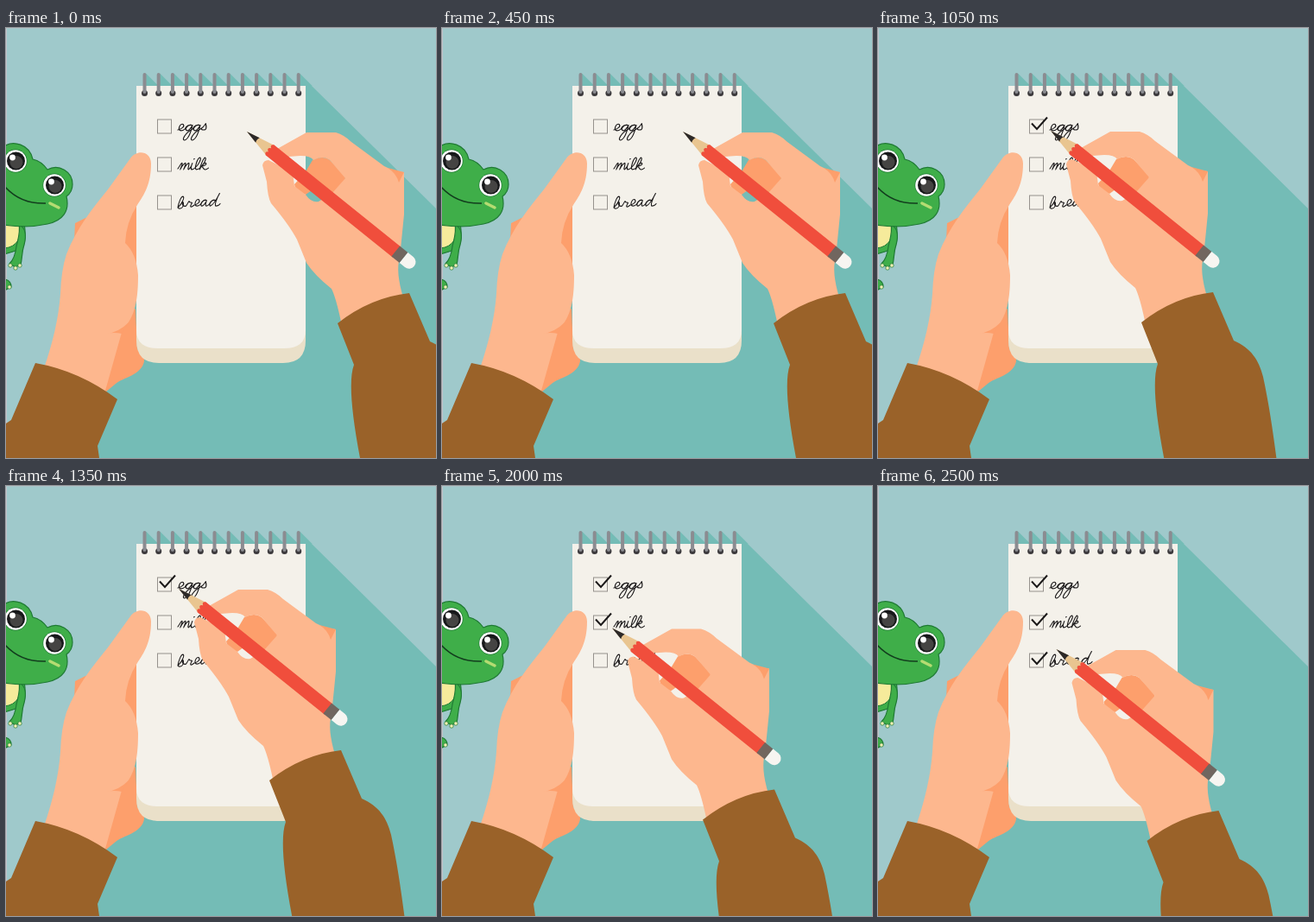
Write an HTML page that moves like this. It is 498x498 px and loops after 2550 ms.

```html
<!DOCTYPE html>
<html lang="en">
<head>
<meta charset="utf-8">
<title>Shopping list</title>
<style>
  html, body { margin: 0; width: 100%; height: 100%; overflow: hidden; background: #9fc9cb; }
  svg { display: block; width: 498px; height: 498px; }
  .skin { fill: #fdb78e; }
  .shade { fill: #fd9f6c; }
  .sleeve { fill: #9a6229; }
  .teal { fill: #74bcb6; }
  .ink { fill: none; stroke: #1d1b1c; stroke-width: 1.2; stroke-linecap: round; stroke-linejoin: round; }
  .box { fill: none; stroke: #96928d; }
  .tick { fill: none; stroke: #1b1919; stroke-width: 2; stroke-dasharray: 3 9; }
  .green { fill: #3fae49; stroke: #1f7a34; stroke-width: 1.2; stroke-linejoin: round; }
</style>
</head>
<body>
<svg viewBox="0 0 498 498">
  <rect width="498" height="498" fill="#9fc9cb"/>
  <path class="teal" d="M151 67H354L498 209V498H90L60 420L151 220Z"/>
  <g id="ringShadows" class="teal"></g>
  <rect width="1" height="498" fill="#c3c5cc"/>
  <rect width="498" height="1" fill="#abc6ca"/>

  <g id="frog">
    <path class="green" d="M-2 226H21C23 238 23 249 18 256L-2 262Z"/>
    <path d="M-2 226H14Q20 236 14 246Q9 254 -2 255Z" fill="#f6eb9b" stroke="#1f7a34"/>
    <path class="green" d="M15 227C22 231 24 240 21 251C18 260 19 266 17 274L11 277L4 273C9 268 11 262 12 253C14 244 17 236 15 227Z"/>
    <path class="green" d="M-2 291Q6 292 6 300L-2 304Z"/>
    <g fill="#f5f0b5" stroke="#1f7a34" stroke-width=".7">
      <circle cx="5" cy="275" r="2.2"/><circle cx="11" cy="278" r="2.2"/>
      <circle cx="16" cy="275" r="2.2"/><circle cx="4" cy="300" r="2.2"/>
    </g>
    <path class="green" d="M-2 137C8 130 27 134 31 152Q41 154 48 164C61 157 77 166 77 181Q77 190 70 195C74 212 66 223 48 227Q25 232 -2 228Z"/>
    <g id="eyes"></g>
    <path d="M-1 184Q17 204 46 203" fill="none" stroke="#123d1d" stroke-width="1.5"/>
    <path d="M51 203L61 208" stroke="#b5dc72" stroke-width="3.5" stroke-linecap="round"/>
  </g>

  <path class="shade" d="M92 220L80 226L79 246L82 256L151 300V204L128 215ZM120 340L150 325L152 372Q161 377 160 386C157 402 135 405 127 412L116 421L100 410Z"/>

  <path d="M151 67H347V362Q347 388 321 388H177Q151 388 151 362Z" fill="#eae0c9"/>
  <path d="M151 67H347V350Q347 371 322 371H176Q151 371 151 350Z" fill="#f4f1ea"/>
  <g id="rings"></g>
  <g id="list"></g>

  <path class="skin" d="M44 394C54 365 61 336 63 308Q64 280 70 262C82 231 101 208 118 187L144 151C152 140 168 143 168 157C168 181 160 193 152 205Q139 225 138 249Q151 261 153 286C153 313 150 335 135 349L115 420L78 410Z"/>
  <path class="shade" d="M116 354Q130 353 142 341L134 354Q126 352 116 354Z"/>
  <path class="sleeve" d="M34 388Q85 397 129 430L106 484L108 498H0V458L6 454Z"/>

  <g id="hand">
    <path class="shade" d="M355 153Q367 147 375 153L393 172L392 190L374 196L361 183L347 193Q334 188 334 181L346 168Z"/>
    <path class="skin" fill-rule="evenodd" d="M314 140L348 121H382Q392 124 400 132L438 160Q449 166 461 167V216Q458 246 456 266Q451 282 460 312L388 340Q382 312 377 302Q357 286 348 272L337 245Q328 228 307 203Q303 196 302 178L297 159Q298 153 304 153L332 167L334 183L347 193Q354 203 362 201L378 191L393 174L375 153Q367 147 356 153Q353 148 341 148L327 149Z"/>
    <path class="shade" d="M442 162L461 167L455 179Q452 168 442 162Z"/>
    <path class="sleeve" d="M384 342Q422 312 467 307L491 363C511 372 520 385 525 405C532 437 538 478 542 512V580H421L410 498Q394 414 403 390Z"/>
    <g transform="translate(279 120) rotate(38.8)">
      <path d="M0 0L36 -7.7V7.7Z" fill="#e9c590"/>
      <path d="M0 0L16 -3.6Q14 0 16 3.6Z" fill="#2c2928"/>
      <path d="M34 -7.7H223V7.7H34Q30 5 34 2.7Q29 0 34 -2.7Q30 -5 34 -7.7Z" fill="#f04e3c"/>
      <rect x="221" y="-7.7" width="12" height="15.4" fill="#71665f"/>
      <path d="M233 -7.7H241A7.7 7.7 0 0 1 241 7.7H233Z" fill="#f7f5f1"/>
    </g>
  </g>
</svg>
<script>
const LOOP = 2550, STEP = 50;
const $ = id => document.getElementById(id);

function add(parent, tag, attrs) {
  const el = document.createElementNS('http://www.w3.org/2000/svg', tag);
  for (const k in attrs) el.setAttribute(k, attrs[k]);
  return parent.appendChild(el);
}

for (let i = 0; i < 12; i++) {
  const x = 160.5 + i * 16.2;
  add($('ringShadows'), 'path', { d: `M${x} 53h2l14 14h-16z` });
  add($('rings'), 'circle', { cx: x, cy: 75.5, r: 3.5, fill: '#3b393c' });
  add($('rings'), 'rect', { x: x - 2, y: 52, width: 4, height: 24, rx: 2, fill: '#8b8c91' });
}

for (const [x, y] of [[11, 154], [56, 182]]) {
  const disc = (dx, dy, r, fill) => add($('eyes'), 'circle', { cx: x + dx, cy: y + dy, r, fill });
  disc(0, 0, 13.5, '#1f7a34');
  disc(0, 0, 12.8, '#fff');
  disc(.5, 0, 10.5, '#17181a');
  disc(1, 1.5, 7.5, '#454443');
  disc(-3.5, -4, 3.4, '#fff');
}

// Joined script: each stroke starts where the previous letter ends.
const script = {
  e: 'c4-1 8-4 5-7c-4-2-6 8-1 8c2 0 3-1 4-2',
  g: 'c1-4 4-6 7-5c-5-1-8 6-4 7c2 0 4-4 5-7c0 8-2 18-6 19c-4 0-1-9 7-14',
  s: 'c3-2 4-4 5-7c1 3 3 8-1 8c-2 0-3-1-3-2',
  m: 'c2-4 3-8 4-7c1 2-1 6-1 8c1-4 4-9 5-8c1 2-1 6-1 8c1-4 4-9 5-8c1 3-1 8 1 8',
  i: 'c2-2 3-5 3-8c-1 4-1 8 1 8c1 0 2-1 3-2',
  l: 'c4-4 6-12 4-13c-3-1-5 14-2 15c2 0 3-1 4-2',
  k: 'c4-4 6-12 4-13c-2 0-4 10-4 15c1-5 4-9 6-8c2 2-3 4-5 4c3 0 3 5 6 4c1 0 2-1 3-2',
  b: 'c4-4 7-13 4-14c-3 0-4 10-4 13c0 3 5 3 6 0c1-3 0-6-1-6c-1 3 2 6 5 5',
  r: 'c2-3 2-6 3-6c0 2 3 1 4 2c-1 3-2 5 0 5c1 0 2-1 3-2',
  a: 'c1-5 5-7 7-5c-5-2-8 6-5 7c3 0 4-4 5-6c-1 4 0 6 1 6c1 0 2-1 3-2',
  d: 'c1-5 5-7 7-5c-5-2-8 6-5 7c4-1 7-10 9-16c-3 7-4 15-2 16c2 0 4-1 5-3'
};

// Tick times: start, corner, end.
const items = [
  { word: 'eggs', y: 106, tickY: 110.5, base: 118, size: 1, times: [750, 800, 950] },
  { word: 'milk', y: 150, tickY: 154.5, base: 163, size: .98, times: [1800, 1850, 1900] },
  { word: 'bread', y: 194, tickY: 199.5, base: 208, size: .91, times: [2250, 2300, 2400] }
];

for (const item of items) {
  add($('list'), 'rect', { class: 'box', x: 175.5, y: item.y, width: 16, height: 16 });
  const word = add($('list'), 'g', {
    role: 'img', 'aria-label': item.word,
    transform: `translate(199 ${item.base}) skewX(-10) scale(${item.size} .92)`
  });
  add(word, 'path', { class: 'ink', d: 'M0 0' + [...item.word].map(c => script[c]).join('') });
  if (item.word === 'milk') add(word, 'path', { class: 'ink', d: 'M17-12l.5-.5' });
  item.tick = add($('list'), 'path', {
    class: 'tick', pathLength: 3, d: `M178 ${item.tickY}l6 6.5 12-13.5`
  });
}

// Hand offset: time, x, y.
const moves = [
  [0, 0, 0], [500, 0, 0], [750, -100, -11], [800, -96, -3], [950, -84, -17],
  [1050, -79, -1], [1400, -79, -1], [1700, -76.5, 29.5], [1800, -101, 34],
  [1850, -96, 40], [1900, -84, 27], [2000, -82, 44.5], [2100, -82, 45],
  [2250, -101, 79], [2300, -96, 85], [2400, -84, 72], [2500, -72.5, 69], [LOOP, -72.5, 69]
];

function at(table, t, col) {
  if (t <= table[0][0]) return table[0][col];
  const i = table.findIndex(row => row[0] >= t);
  if (i < 0) return table[table.length - 1][col];
  const a = table[i - 1], b = table[i];
  return a[col] + (b[col] - a[col]) * (t - a[0]) / (b[0] - a[0]);
}

function draw(t) {
  $('hand').setAttribute('transform', `translate(${at(moves, t, 1)} ${at(moves, t, 2)})`);
  for (const { tick, times } of items) {
    const done = at(times.map((time, i) => [time, i / 2 * (i + 1)]), t, 1);
    tick.style.strokeDashoffset = 3 - done;
    tick.style.visibility = done > 0 ? 'visible' : 'hidden';
  }
}

const start = performance.now();
function frame() {
  const t = (performance.now() - start) % LOOP;
  draw(Math.floor(t / STEP) * STEP);
  requestAnimationFrame(frame);
}
frame();
</script>
</body>
</html>
```
